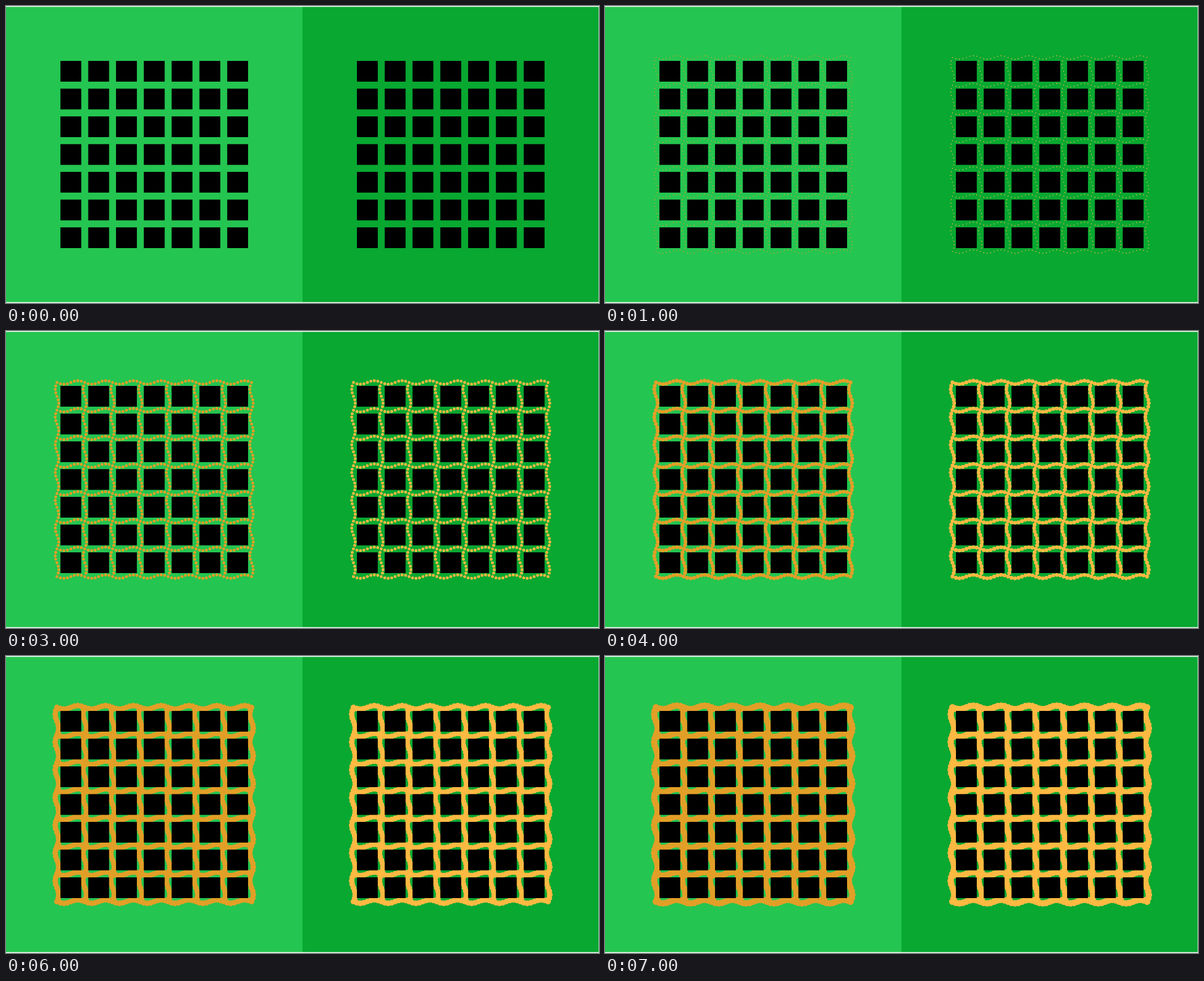
These frames come from a looping animation (1056x530 px, 8000 ms). An HTML page:

```html
<!DOCTYPE html>
<html lang="en">
<head>
<meta charset="utf-8">
<title>Wavy grid illusion</title>
<style>
  html, body { margin: 0; width: 100%; height: 100%; overflow: hidden; background: #fff; }
  svg { display: block; width: 1056px; height: 530px; }
  .dots {
    fill: none;
    stroke-linecap: round;
    stroke-width: 0px;
    animation: grow 8s steps(8, end) infinite;
  }
  .left { stroke: #e29f27; }
  .right { stroke: #feb942; }
  @keyframes grow {
    from { stroke-width: 0px; }
    to { stroke-width: 13.6px; }
  }
</style>
</head>
<body>
<svg viewBox="0 0 1056 530">
  <rect y="1.5" width="528" height="527" fill="#24c550"/>
  <rect x="528" y="1.5" width="527.4" height="527" fill="#08a831"/>
  <g transform="translate(264 265)">
    <path class="dots left"/>
    <path class="squares"/>
  </g>
  <g transform="translate(792 265)">
    <path class="dots right"/>
    <path class="squares"/>
  </g>
</svg>
<script>
  const cells = 7, pitch = 49.5, side = 37.125;
  const amp = 3.1, perCell = 8;
  const start = -cells * pitch / 2;

  // Zero-length strokes with round caps are dots whose size is the stroke width.
  const dot = (x, y) => `M${x.toFixed(2)} ${y.toFixed(2)}h0`;

  let dots = '', squares = '';
  for (let line = 0; line <= cells; line++) {
    const across = start + line * pitch;
    for (let k = 0; k <= cells * perCell; k++) {
      const along = start + k * pitch / perCell;
      const wave = amp * Math.sin(2 * Math.PI * k / perCell);
      dots += dot(along, across + wave) + dot(across - wave, along);
    }
  }

  const inset = start + (pitch - side) / 2;
  for (let row = 0; row < cells; row++) {
    for (let col = 0; col < cells; col++) {
      squares += `M${inset + col * pitch} ${inset + row * pitch}h${side}v${side}h${-side}z`;
    }
  }

  const draw = (name, d) =>
    document.querySelectorAll(name).forEach(path => path.setAttribute('d', d));
  draw('.dots', dots);
  draw('.squares', squares);
</script>
</body>
</html>
```
